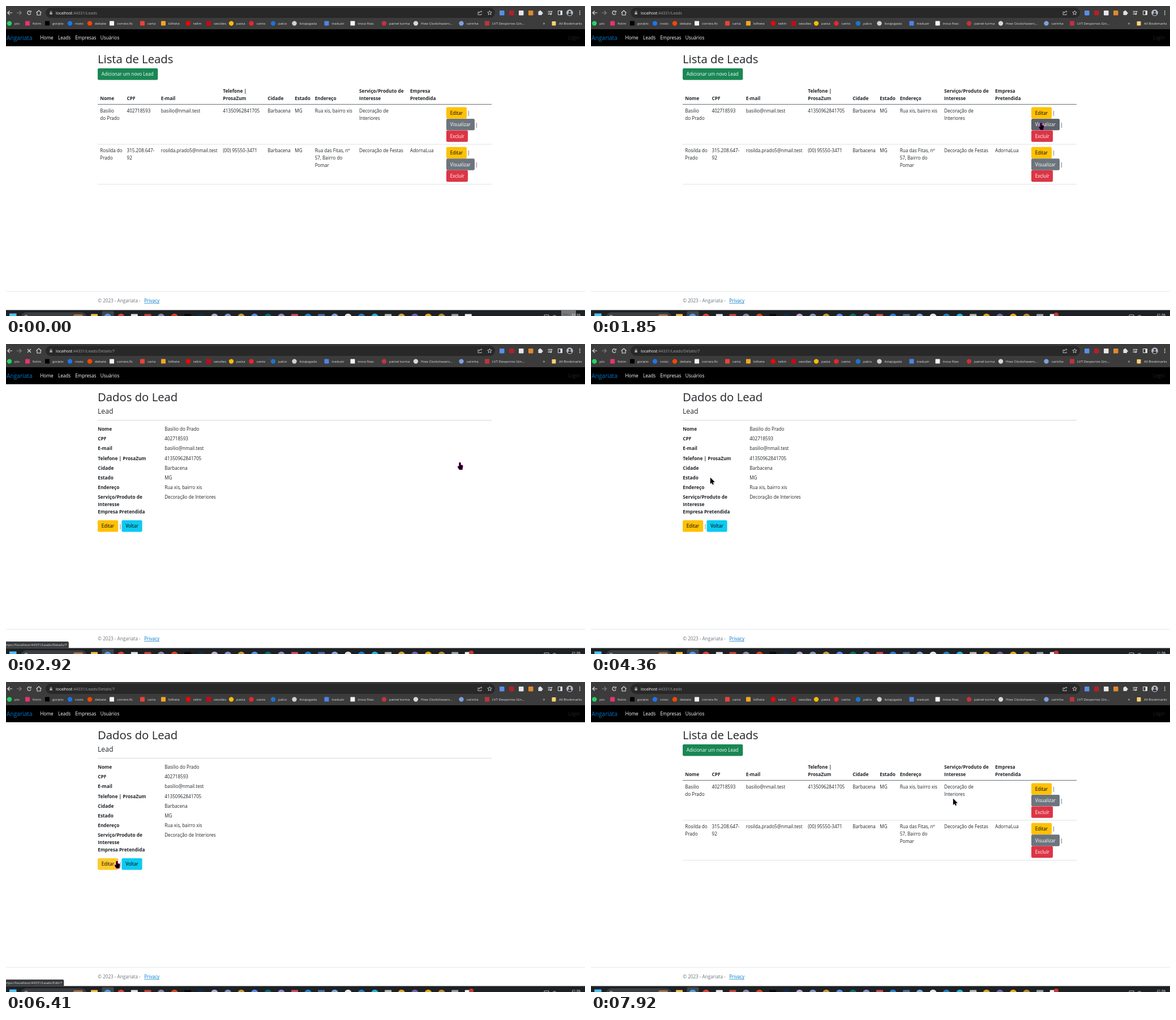
These frames come from a looping animation (1023x547 px, 7990 ms). An HTML page with a canvas:

```html
<!DOCTYPE html>
<html lang="pt">
<head>
<meta charset="utf-8">
<title>Lista de Leads</title>
<style>
html, body { margin: 0; width: 100%; height: 100%; overflow: hidden; background: #fff; }
canvas { display: block; }
</style>
</head>
<body>
<canvas id="stage" width="1023" height="547"></canvas>
<script>
const W = 1023, H = 547, LOOP = 7990;
const ctx = document.getElementById('stage').getContext('2d');
const FONT = '"Open Sans", "Noto Sans", sans-serif';
const INK = '#212529', LINK = '#0077cc', RULE = '#dee2e6', LIGHT = '#dfe1e5';
const BRAND = 'Angariata', BODY = 8.14, BOLD = 8.25, SMALL = 6.1;

function rect(x, y, w, h, color, r = 0) {
  ctx.fillStyle = color;
  ctx.beginPath();
  ctx.roundRect(x, y, w, h, r);
  ctx.fill();
}
function dot(x, y, r, color) {
  ctx.fillStyle = color;
  ctx.beginPath();
  ctx.arc(x, y, r, 0, Math.PI * 2);
  ctx.fill();
}
function path(points, color, width = 1, closed = false) {
  ctx.strokeStyle = color;
  ctx.lineWidth = width;
  ctx.beginPath();
  points.forEach(([x, y]) => ctx.lineTo(x, y));
  if (closed) ctx.closePath();
  ctx.stroke();
}
function text(s, x, y, size = BODY, color = INK, weight = 400) {
  ctx.font = `${weight} ${size}px ${FONT}`;
  ctx.fillStyle = color;
  ctx.fillText(s, x, y);
  return ctx.measureText(s).width;
}
function lines(list, x, y, size, weight) {
  list.forEach((s, i) => text(s, x, y + i * 12.9, size, INK, weight));
}

// Buttons: x, y, width, label, fill, hover fill, label colour, address
const YELLOW = ['#ffc107', '#ffca2c', '#000'];
const GREY = ['#6c757d', '#5c636a', '#fff'];
const RED = ['#dc3545', '#bb2d3b', '#fff'];
const button = (x, y, w, label, [fill, over, ink], url) => ({ x, y, w, h: 20.4, label, fill, over, ink, url });
const rowButtons = (y, id) => [
  button(778, y, 36, 'Editar', YELLOW, 'Edit/' + id),
  button(778, y + 20.5, 50, 'Visualizar', GREY, 'Details/' + id),
  button(778, y + 41, 38, 'Excluír', RED, 'Delete/' + id)
];
const listButtons = [
  button(162, 110, 106.3, 'Adicionar um novo Lead', ['#198754', '#157347', '#fff'], 'Create'),
  ...rowButtons(178.4, 7), ...rowButtons(248.8, 8)
];
const detailButtons = [
  button(162, 311, 36.2, 'Editar', YELLOW, 'Edit/7'),
  button(204.4, 311, 36.2, 'Voltar', ['#0dcaf0', '#31d2f2', '#000'], '')
];
const inside = (b, x, y) => x >= b.x && x <= b.x + b.w && y >= b.y && y <= b.y + b.h;

function drawButtons(list, hot) {
  for (const b of list) {
    rect(b.x, b.y, b.w, b.h, b === hot ? b.over : b.fill, 2.1);
    text(b.label, b.x + 6.8, b.y + 13.3, BODY, b.ink);
  }
}

// Bookmarks: icon x, label, colour, square?
const bookmarks = [
  [6, 'pio', '#25d366'], [38, 'fotim', '#e8336d', 1], [73, 'gorjeio', '#000', 1],
  [113, 'rosto', '#1877f2'], [148, 'debate', '#ff4500'], [187, 'correio.fic', '#f4f4f4', 1],
  [241, 'carta', '#ea4335', 1], [278, 'bilhete', '#f5a623', 1], [322, 'telim', '#ff0000'],
  [358, 'sessões', '#c90813', 1], [398, 'pasta', '#fbbc04'], [433.5, 'canto', '#f0242c'],
  [472, 'palco', '#1a75d1'], [509.5, 'listajogada', '#d0d0d0'], [566.5, 'traduzir', '#4c84e8', 1],
  [612.5, 'troca fitas', '#f4f4f4', 1], [668, 'painel turma', '#c8313b'],
  [724, 'How Clockchasers...', '#d8d8d8'], [804.5, 'carinha', '#7e9fe0'],
  [850, 'LVT Desportos Gin...', '#c0323c', 1]
];
const extensions = [[876, '#5b8fe8'], [893, '#b3202a'], [910, '#e8e8e8'], [927, '#e08a2c']];

function drawToolbar(address, loading) {
  rect(0, 0, W, 41, '#3c3c3c');
  path([[11, 12], [3, 12], [6.5, 8.5]], LIGHT, 1.1);
  path([[3, 12], [6.5, 15.5]], LIGHT, 1.1);
  path([[19, 12], [27, 12], [23.5, 8.5]], '#858585', 1.1);
  path([[27, 12], [23.5, 15.5]], '#858585', 1.1);
  if (loading) {
    path([[38, 9], [44, 15]], LIGHT, 1.1);
    path([[44, 9], [38, 15]], LIGHT, 1.1);
  } else {
    ctx.strokeStyle = LIGHT;
    ctx.lineWidth = 1.1;
    ctx.beginPath();
    ctx.arc(41, 12, 3.2, 0.4, 5.4);
    ctx.stroke();
    path([[44.2, 8], [44.2, 11], [41.4, 11]], LIGHT, 1);
  }
  path([[53.5, 12], [58, 8], [62.5, 12]], LIGHT, 1.1);
  path([[55, 11.5], [55, 16], [61, 16], [61, 11.5]], LIGHT, 1.1);

  rect(70, 3, 794, 18, '#282828', 9);
  rect(77.3, 11.3, 4.4, 3.6, '#a5a8ac', 0.5);
  path([[78.2, 11.5], [78.2, 9.3], [80.8, 9.3], [80.8, 11.5]], '#a5a8ac', 0.8);
  const w = text('localhost', 88, 14.5, 7, '#fff');
  text(':44331/Leads' + address, 88 + w, 14.5, 7, '#9aa0a6');

  path([[836, 10.5], [834, 10.5], [834, 15.5], [840, 15.5], [840, 13.5]], LIGHT, 0.8);
  path([[836, 13], [837, 10.2], [841, 10.2], [839, 8.2]], LIGHT, 0.8);
  const star = Array.from({ length: 10 }, (_, i) => {
    const a = i * Math.PI / 5 - Math.PI / 2, r = i % 2 ? 1.8 : 4;
    return [854.5 + r * Math.cos(a), 12.2 + r * Math.sin(a)];
  });
  path(star, LIGHT, 0.8, true);

  for (const [x, c] of extensions) rect(x - 4, 8, 8.5, 8.5, c, 1);
  rect(940.5, 9.3, 6.5, 6.7, LIGHT, 0.8);
  dot(943.8, 9.2, 1.4, LIGHT);
  dot(947.3, 12.6, 1.4, LIGHT);
  path([[957.5, 9.5], [965.5, 9.5]], LIGHT, 1);
  path([[957.5, 12], [962, 12]], LIGHT, 1);
  path([[957.5, 14.5], [961, 14.5]], LIGHT, 1);
  path([[963.8, 9.5], [963.8, 14]], LIGHT, 1);
  dot(962.7, 14.3, 1.4, LIGHT);
  path([[975.5, 8.5], [982.5, 8.5], [982.5, 15.5], [975.5, 15.5]], LIGHT, 1, true);
  rect(979.5, 8.5, 3, 7, LIGHT);
  dot(996, 12, 5.8, '#b7bcc2');
  dot(996, 10.6, 2, '#30343a');
  rect(992.8, 13, 6.4, 3.6, '#30343a', 1.8);
  for (const y of [9, 12, 15]) dot(1013.8, y, 0.9, LIGHT);

  for (const [x, label, color, square] of bookmarks) {
    if (square) rect(x - 4, 26.6, 8, 8, color, 0.8);
    else dot(x, 30.6, 4.2, color);
    text(label, x + 9, 32.8, SMALL, LIGHT);
  }
  text('»', 948.5, 32.8, 8, LIGHT);
  rect(964.5, 27, 7, 7.5, '#f6d272', 0.8);
  text('All Bookmarks', 977, 32.8, SMALL, LIGHT);
}

function drawFrame() {
  rect(0, 41, W, 30, '#000');
  text(BRAND, 1, 60, 10.2, LINK);
  [['Home', 60.5], ['Leads', 92], ['Empresas', 122.3], ['Usuários', 166.8]]
    .forEach(([s, x]) => text(s, x, 59, BODY, '#fff'));
  text('Login', 993, 59, BODY, INK);
  rect(0, 503.2, W, 0.9, RULE);
  text(`© 2023 - ${BRAND} -`, 162.3, 523.3, BODY, '#6c757d');
  const w = text('Privacy', 244.2, 523.3, BODY, LINK);
  rect(244.2, 524.3, w, 0.7, LINK);
}

const taskColors = ['#f3c14b', '#4f9fe6', '#dc4437', '#e4e4e4', '#c7473c', '#8b86a6', '#d9471f', '#08080a',
  '#0d2d52', '#b9a9d8', '#7d93c8', '#c89a3c', '#5a8df0', '#0c6d70', '#8e8ad0', '#cf4e5f', '#2385d2',
  '#4d6f9e', '#79a9dc', '#e6e6e6', '#2b7cc0', '#25b3d8', '#b8b8b8', '#e0a527', '#7864a8', '#e6ac1d',
  '#b98b34', '#9aa0a4', '#f2f2f2'];
const squareTasks = [0, 3, 4, 7, 15, 17, 22, 27, 28];

function drawTaskbar(t) {
  rect(0, 536.5, W, 11, '#1e2124');
  rect(6, 542.5, 12.5, 8, '#4cc2ff');
  rect(26, 540.5, 117, 20, '#3b3e41', 10);
  ctx.strokeStyle = LIGHT;
  ctx.lineWidth = 0.9;
  ctx.beginPath();
  ctx.arc(35.5, 548, 2.6, 0, 7);
  ctx.stroke();
  rect(119, 544, 17, 6, '#a8744c', 3);
  rect(169.5, 538.5, 21, 12, '#41464b', 2);
  taskColors.forEach((c, i) => {
    const x = 156 + i * 23.6;
    if (squareTasks.includes(i)) rect(x - 6, 543.5, 12, 6, c, 1);
    else dot(x, 549, 6.2, c);
  });
  if (t >= 200) dot(822, 545, 4, '#c9372f');
  path([[951, 548], [951, 545], [959, 545], [959, 548]], LIGHT, 0.8);
  path([[966, 547], [969, 545.5], [972, 547]], LIGHT, 0.8);
  if (t < 70) {
    rect(981, 537, 26, 10, '#77797b');
    text('Rec...', 984, 546, SMALL, '#4b4d4f');
  }
  text('21:36', 999.5, 547.3, SMALL, '#fff');
}

const columns = [
  [166.3, ['Nome'], ['Basilio', 'do Prado'], ['Rosilda do', 'Prado']],
  [213.5, ['CPF'], ['402718593'], ['315.208.647-', '92']],
  [273.8, ['E-mail'], ['basilio@nmail.test'], ['rosilda.prado5@nmail.test']],
  [383.2, ['Telefone |', 'ProsaZum'], ['41350962841705'], ['(00) 95550-3471']],
  [462.3, ['Cidade'], ['Barbacena'], ['Barbacena']],
  [510.3, ['Estado'], ['MG'], ['MG']],
  [545.7, ['Endereço'], ['Rua xis, bairro xis'], ['Rua das Fitas, nº', '57, Bairro do', 'Pomar']],
  [624, ['Serviço/Produto de', 'Interesse'], ['Decoração de', 'Interiores'], ['Decoração de Festas']],
  [714, ['Empresa', 'Pretendida'], [], ['AdornaLua']]
];

function drawList(hot) {
  text('Lista de Leads', 162, 101.3, 20.3, INK, 500);
  for (const [x, head, first, second] of columns) {
    lines(head, x, 165.8 - (head.length - 1) * 12.9, BOLD, 700);
    lines(first, x, 188);
    lines(second, x, 258.3);
  }
  rect(162, 173.2, 696, 0.9, '#3a4045');
  rect(162, 243.6, 696, 0.8, RULE);
  rect(162, 314.1, 696, 0.8, RULE);
  for (const y of [192, 262.4]) {
    text('|', 815.5, y);
    text('|', 829.3, y + 20.5);
  }
  drawButtons(listButtons, hot);
}

const details = [
  [['Nome'], 'Basilio do Prado'], [['CPF'], '402718593'], [['E-mail'], 'basilio@nmail.test'],
  [['Telefone | ProsaZum'], '41350962841705'], [['Cidade'], 'Barbacena'], [['Estado'], 'MG'],
  [['Endereço'], 'Rua xis, bairro xis'],
  [['Serviço/Produto de', 'Interesse', 'Empresa Pretendida'], 'Decoração de Interiores']
];

function drawDetails(hot) {
  text('Dados do Lead', 162, 101.3, 20.3, INK, 500);
  text('Lead', 162, 122.8, 12.2, INK, 500);
  rect(162, 133.9, 696, 0.8, '#c7c8c9');
  details.forEach(([labels, value], i) => {
    const y = 153 + i * 17.2;
    lines(labels, 162.3, y, BOLD, 700);
    text(value, 280.2, y);
  });
  text('|', 199.7, 324.5);
  drawButtons(detailButtons, hot);
}

// Pointer legs: start, end, bend x, bend y, goal x, goal y
const START = [1000, 546];
const legs = [
  [70, 920, 830, 430, 684, 323],
  [1060, 1600, 775, 270, 797, 184],
  [1600, 1850, 797, 195, 795, 206],
  [1910, 2520, 799, 207, 802, 209],
  [3180, 3710, 600, 140, 396, 158],
  [3900, 4360, 260, 165, 211, 236],
  [4360, 4690, 195, 270, 194, 305],
  [4690, 5080, 194, 311, 196, 316],
  [6410, 6900, 215, 318, 236, 328],
  [7460, 7920, 440, 255, 640, 206]
];
function pointerAt(t) {
  let [x, y] = START;
  for (const [a, b, bx, by, gx, gy] of legs) {
    if (t <= a) break;
    const u = Math.min(1, (t - a) / (b - a)), s = u * u * (3 - 2 * u), r = 1 - s;
    x = r * r * x + 2 * r * s * bx + s * s * gx;
    y = r * r * y + 2 * r * s * by + s * s * gy;
  }
  return [x, y];
}

const ARROW = new Path2D('M0 0V10.5L2.4 8.4L4 12L5.6 11.3L4.1 7.8L7.4 7.5Z');
const HAND = new Path2D('M-1.2.8Q0-.7 1.2.8V4.4L4 5Q5.2 5.3 5 7L4.3 10.5V12.5H-1L-3.6 8.2Q-3.9 6.4-2.4 6.8L-1.2 7.8Z');

function drawPointer(x, y, hand) {
  const shape = hand ? HAND : ARROW;
  ctx.save();
  ctx.setTransform(1, 0, 0, 1, x, y);
  ctx.lineJoin = 'round';
  ctx.strokeStyle = hand ? '#e321d5' : '#7a3b78';
  ctx.lineWidth = hand ? 1.3 : 0.7;
  ctx.stroke(shape);
  ctx.fillStyle = '#000';
  ctx.fill(shape);
  ctx.restore();
}

function drawStatus(url) {
  const s = 'https://localhost:44331/Leads' + (url && '/' + url);
  ctx.font = `400 ${SMALL}px ${FONT}`;
  const end = ctx.measureText(s).width - 3.7;
  rect(-2, 525, end + 5, 11.5, '#3a3b3d', [0, 2, 0, 0]);
  text(s, -3.7, 533, SMALL, '#e4e5e7');
}

function draw(t) {
  const onDetails = t >= 2850 && t < 7080;
  const loading = (t >= 2450 && t < 2990) || (t >= 6980 && t < 7260);
  const [x, y] = pointerAt(t);
  // The pointer and address stay as they were until the mouse moves again.
  const stale = t >= 2850 && t < 3240 ? 'Details/7' : t >= 7080 && t < 7500 ? '' : null;
  const hot = stale === null &&
    (onDetails ? detailButtons : listButtons).find(b => inside(b, x, y));
  const url = hot ? hot.url : stale;

  rect(0, 0, W, H, '#fff');
  drawToolbar(onDetails ? '/Details/7' : '', loading);
  drawFrame();
  (onDetails ? drawDetails : drawList)(hot);
  if (url !== null && t >= 1910) drawStatus(url);
  drawTaskbar(t);
  if (t >= 70) drawPointer(x, y, url !== null);
}

const begin = performance.now();
function tick(now) {
  draw(Math.max(0, now - begin) % LOOP);
  requestAnimationFrame(tick);
}
draw(0);
requestAnimationFrame(tick);
</script>
</body>
</html>
```
